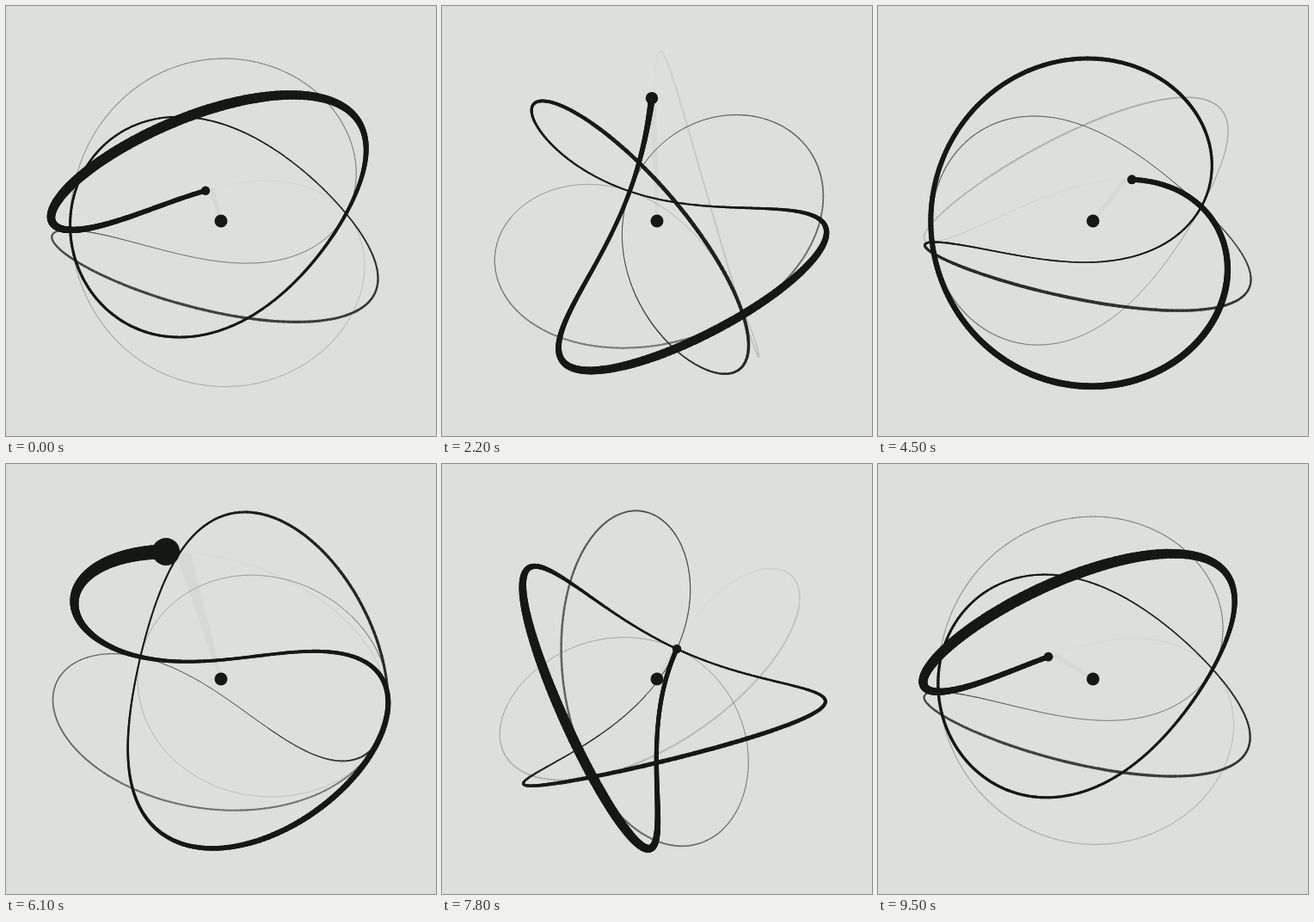
An HTML page with a canvas for the animation above (9.6 s loop, 500x500 px).

```html
<!DOCTYPE html>
<html lang="en">
<head>
<meta charset="utf-8">
<title>Orbit trail</title>
<style>
  html, body { margin: 0; width: 100%; height: 100%; overflow: hidden; background: #dcdfda; }
  canvas { display: block; width: 500px; height: 500px; }
</style>
</head>
<body>
<canvas id="stage" width="500" height="500"></canvas>
<script>
const ctx = document.getElementById('stage').getContext('2d');
const LOOP = 9600, STEP = 100;
const CENTER = 250, RADIUS = 161.4, DEPTH = 0.577;
const TILT = 0.347, SPIN = 1.743;
const DOT = 7.5, HEAD = 8;
const SAMPLES = 1200;
const PAPER = [220, 223, 218], INK = [22, 24, 19];
const sinT = Math.sin(TILT), cosT = Math.cos(TILT);

const turn = t => t / LOOP * 2 * Math.PI;

// Blend from paper to ink, kept opaque so overlapping segments stay even.
const tone = k => `rgb(${PAPER.map((p, i) => Math.round(p + (INK[i] - p) * k))})`;

// Spherical curve: four pole-to-pole turns for each turn around the axis.
function project(t, spin) {
  const s = turn(t), c = Math.cos(4 * s);
  const h = c * Math.cos(s), v = c * Math.sin(s), n = Math.sin(4 * s);
  const x = h * Math.cos(spin) + n * Math.sin(spin);
  const z = n * Math.cos(spin) - h * Math.sin(spin);
  const scale = 1 / (1 - DEPTH * (z * cosT + v * sinT));
  return {
    x: CENTER + RADIUS * x * scale,
    y: CENTER - RADIUS * (v * cosT - z * sinT) * scale,
    scale
  };
}

function disc(x, y, r) {
  ctx.fillStyle = tone(1);
  ctx.beginPath();
  ctx.arc(x, y, r, 0, 2 * Math.PI);
  ctx.fill();
}

// Faint wedge from the centre towards the moving point.
function beam(p) {
  const dx = p.x - CENTER, dy = p.y - CENTER, len = Math.hypot(dx, dy) || 1;
  const nx = -dy / len, ny = dx / len, w = 4 * p.scale;
  ctx.fillStyle = tone(0.035);
  ctx.beginPath();
  ctx.moveTo(CENTER + nx * 2, CENTER + ny * 2);
  ctx.lineTo(p.x + nx * w, p.y + ny * w);
  ctx.lineTo(p.x - nx * w, p.y - ny * w);
  ctx.lineTo(CENTER - nx * 2, CENTER - ny * 2);
  ctx.fill();
}

function trail(t, spin) {
  ctx.lineCap = 'round';
  let a = project(t - LOOP, spin);
  for (let i = 1; i <= SAMPLES; i++) {
    const life = i / SAMPLES;
    const b = project(t - LOOP * (1 - life), spin);
    ctx.strokeStyle = tone(Math.min(1, 1.6 * life));
    ctx.lineWidth = b.scale * (0.9 + 7.6 * life ** 3.8);
    ctx.beginPath();
    ctx.moveTo(a.x, a.y);
    ctx.lineTo(b.x, b.y);
    ctx.stroke();
    a = b;
  }
}

function draw(t) {
  const spin = SPIN - turn(t);
  ctx.fillStyle = tone(0);
  ctx.fillRect(0, 0, 500, 500);
  beam(project(t + 25, spin));
  trail(t, spin);
  const head = project(t, spin);
  disc(CENTER, CENTER, DOT);
  disc(head.x, head.y, HEAD * head.scale);
}

let start = null, shown = -1;
function tick(now) {
  if (start === null) start = now;
  const step = Math.floor((now - start) / STEP + 0.1) % (LOOP / STEP);
  if (step !== shown) draw((shown = step) * STEP);
  requestAnimationFrame(tick);
}
draw(0);
requestAnimationFrame(tick);
</script>
</body>
</html>
```
